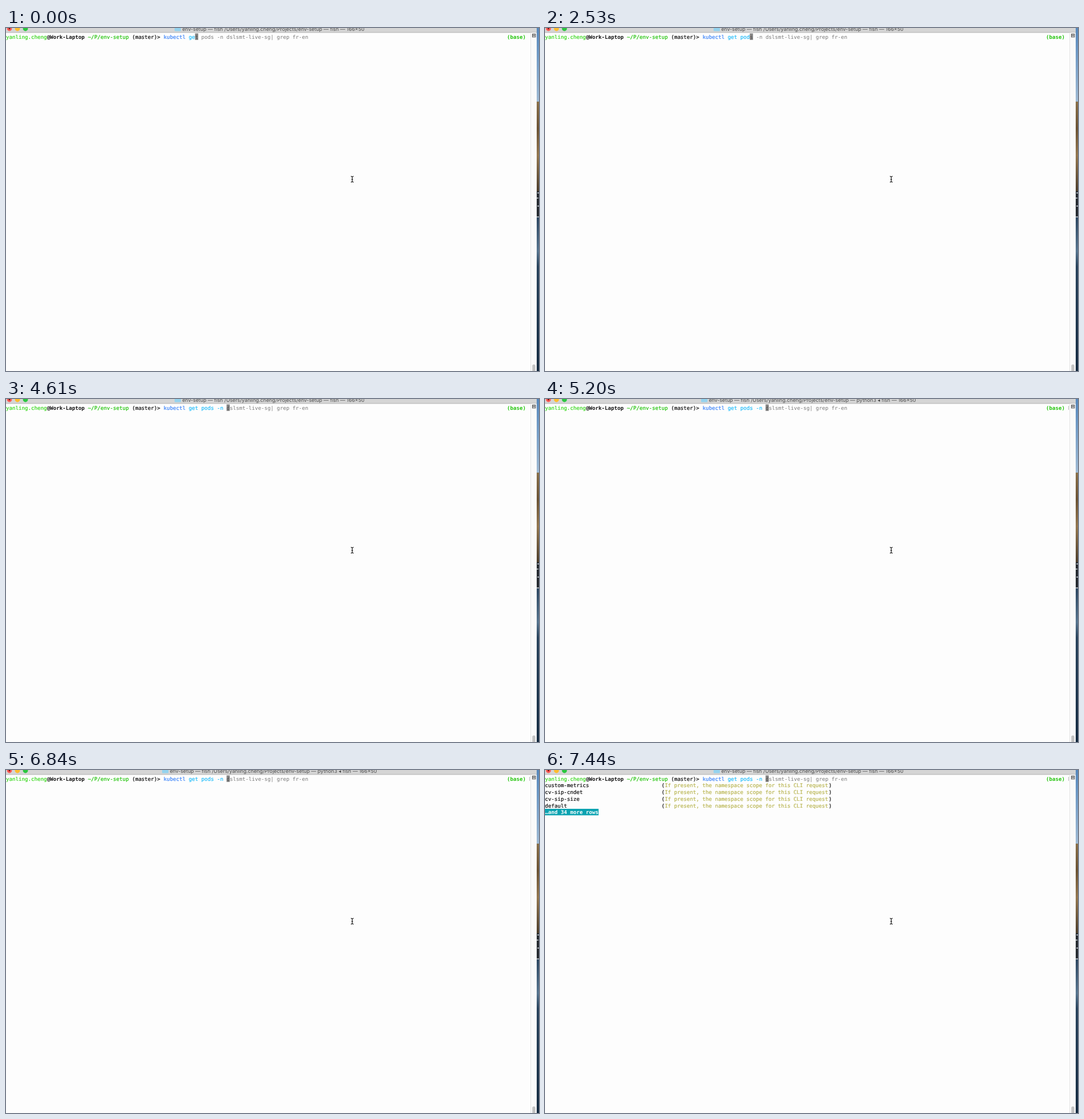
An HTML page for the animation above (8 s loop, 932 by 601 pixels).

```html
<!DOCTYPE html>
<html lang="en">
<head>
<meta charset="utf-8">
<title>Terminal</title>
<style>
html, body { margin: 0; width: 100%; height: 100%; overflow: hidden; background: #fdfdfd; }
svg { display: block; width: 932px; height: 601px; }
text { white-space: pre; text-rendering: geometricPrecision; }
.mono { font: 9.15px "DejaVu Sans Mono", monospace; }
.mid { stroke: currentColor; stroke-width: .22px; }
.bold { font-weight: bold; }
.title { font: 8.8px Inter, "DejaVu Sans", sans-serif; fill: #4a4a4a; }
</style>
</head>
<body>
<svg id="stage" viewBox="0 0 932 601" xmlns="http://www.w3.org/2000/svg">
  <defs>
    <linearGradient id="sky" x2="0" y2="1">
      <stop offset="0" stop-color="#5688bd"/><stop offset="1" stop-color="#9fbad3"/>
    </linearGradient>
    <linearGradient id="rock" x2="0" y2="1">
      <stop offset="0" stop-color="#8a7049"/><stop offset=".3" stop-color="#6b5233"/>
      <stop offset=".6" stop-color="#94774f"/><stop offset="1" stop-color="#4c3d2b"/>
    </linearGradient>
    <linearGradient id="sea" x2="0" y2="1">
      <stop offset="0" stop-color="#2c4660"/><stop offset=".22" stop-color="#587690"/>
      <stop offset=".32" stop-color="#29435c"/><stop offset="1" stop-color="#142a40"/>
    </linearGradient>
  </defs>
  <rect width="932" height="601" fill="#fdfdfd"/>
  <g id="desktop">
    <rect x="928" width="4" height="129" fill="url(#sky)"/>
    <rect x="928" y="129" width="4" height="157" fill="url(#rock)"/>
    <rect x="928" y="286" width="4" height="46" fill="#252a30"/>
    <path d="M929 289h3M928 298h3M929 312h3M928 331h4" stroke="#c9d0d6" stroke-width="1.6"/>
    <rect x="928" y="332" width="4" height="269" fill="url(#sea)"/>
  </g>
  <g id="bar">
    <rect width="928" height="8" fill="#d5d5d5"/>
    <rect y="7.4" width="928" height="1" fill="#b3b3b3"/>
    <circle cx="6" cy="1" r="4.4" fill="#fc5b57"/>
    <circle cx="6" cy="1" r="1.4" fill="#6e1512"/>
    <circle cx="20" cy="1" r="4.4" fill="#fdbc2e"/>
    <circle cx="34" cy="1" r="4.4" fill="#2ac73f"/>
    <g id="heading">
      <rect width="11" height="6.2" y="-.6" rx="1" fill="#94d2ee"/>
      <text id="title" class="title" x="13.4" y="4.5"/>
    </g>
  </g>
  <g id="scroll">
    <rect x="917" y="8.4" width="11" height="592.6" fill="#fafafa"/>
    <rect x="917" y="8.4" width="1" height="592.6" fill="#e4e4e4"/>
    <rect x="920.3" y="589.5" width="5.4" height="14" rx="2.7" fill="#c3c3c3"/>
    <rect x="920.5" y="10.5" width="5.4" height="5.4" fill="#fff" stroke="#555" stroke-width="1"/>
    <path d="M921 12.2h4.5M921 13.8h4.5" stroke="#444" stroke-width=".9"/>
  </g>
  <g id="prompt"/>
  <g id="list"/>
  <g id="command"/>
  <rect id="mark" x="915" y="12" width="1" height="7" fill="#b8b8b8"/>
  <path d="M603 259.9q2 0 2.4 1.2q.4-1.2 2.4-1.2M605.4 261v8M603 270.1q2 0 2.4-1.2q.4 1.2 2.4 1.2M604.2 265.4h2.4"
        fill="none" stroke="#111" stroke-width="1.1"/>
</svg>
<script>
const LOOP = 8000, CELL = 5.51, ROW = 11.7, TOP = 9.5;
const BASE = 50;
const FULL = "kubectl get pods -n dslsmt-live-sg| grep fr-en";
const USER = "yanling.cheng";
const GREEN = "#22c40b", LIME = "#3ad81f", CYAN = "#22bdfb", BLUE = "#3f86fa", GREY = "#7b7b7b";

// [start, typed text, whether the suggestion is visible]
const TYPING = [
  [0, "kubectl ge", 1], [150, "kubectl get", 1], [590, "kubectl get ", 1],
  [1490, "kubectl get p", 1], [1940, "kubectl get po", 1], [2530, "kubectl get pod", 1],
  [2680, "kubectl get pods", 1], [2980, "kubectl get pods ", 1], [3580, "kubectl get pods -", 1],
  [3720, "kubectl get pods -nm", 0], [4470, "kubectl get pods -n", 0], [4610, "kubectl get pods -n ", 1]
];
// [start, running process, left edge of the heading]
const TITLES = [
  [0, "fish", 294.8], [5050, "kubectl ◂ fish", 274.8], [5200, "python3 ◂ fish", 273],
  [5950, "kubectl ◂ fish", 274.8], [6250, "python3 ◂ fish", 273],
  [6700, "kubectl ◂ fish", 274.8], [6840, "python3 ◂ fish", 273], [7440, "fish", 294.8]
];

const $ = id => document.getElementById(id);
const at = (steps, t) => steps.filter(s => s[0] <= t).pop();

function add(parent, tag, attrs, text = "") {
  const el = document.createElementNS("http://www.w3.org/2000/svg", tag);
  for (const k in attrs) el.setAttribute(k, attrs[k]);
  el.textContent = text;
  parent.append(el);
}

function put(parent, col, row, text, color, weight = "") {
  add(parent, "text", {
    x: col * CELL, y: TOP + row * ROW + 9.2, fill: color, color, class: "mono " + weight
  }, text);
}

function block(parent, col, row, cells, color) {
  add(parent, "rect", { x: col * CELL, y: TOP + row * ROW, width: cells * CELL, height: 11.4, fill: color });
}

function buildPrompt() {
  const p = $("prompt");
  put(p, 0, 0, USER, LIME, "mid");
  put(p, 13, 0, "@Work-Laptop", "#111", "bold");
  put(p, 26, 0, "~/P/env-setup", GREEN, "mid");
  put(p, 40, 0, "(master)>", "#111", "mid");
  put(p, 159, 0, "(base)", GREEN, "bold");
}

function buildList() {
  const g = $("list");
  ["custom-metrics", "cv-sip-cndet", "cv-sip-size", "default"].forEach((name, i) => {
    put(g, 0, i + 1, name, "#111", "mid");
    put(g, 37, i + 1, "(", "#111", "mid");
    put(g, 38, i + 1, "If present, the namespace scope for this CLI request", "#b9b552", "mid");
    put(g, 90, i + 1, ")", "#111", "mid");
  });
  block(g, 0, 5, 17, "#0ba3b1");
  put(g, 0, 5, "…and 34 more rows", "#fff", "bold");
}

function drawCommand(typed, hint) {
  const g = $("command"), n = typed.length;
  g.replaceChildren();
  put(g, BASE, 0, "kubectl", BLUE, "mid");
  put(g, BASE + 8, 0, typed.slice(8), CYAN, "mid");
  block(g, BASE + n, 0, 1, "#858585");
  if (!hint) return;
  put(g, BASE + n, 0, FULL[n], "#555");
  put(g, BASE + n + 1, 0, FULL.slice(n + 1), GREY);
}

let lastStep, lastTitle;
function draw(t) {
  const step = at(TYPING, t), title = at(TITLES, t);
  if (step !== lastStep) drawCommand(step[1], step[2]);
  if (title !== lastTitle) {
    $("title").textContent = `env-setup — fish /Users/${USER}/Projects/env-setup — ${title[1]} — 166×50`;
    $("heading").setAttribute("transform", `translate(${title[2]} 0)`);
  }
  lastStep = step;
  lastTitle = title;
  $("mark").style.display = t >= 4910 ? "" : "none";
  $("list").style.display = t >= 7290 ? "" : "none";
}

buildPrompt();
buildList();
draw(0);
const start = performance.now();
function tick() {
  draw((performance.now() - start) % LOOP);
  requestAnimationFrame(tick);
}
requestAnimationFrame(tick);
</script>
</body>
</html>
```
